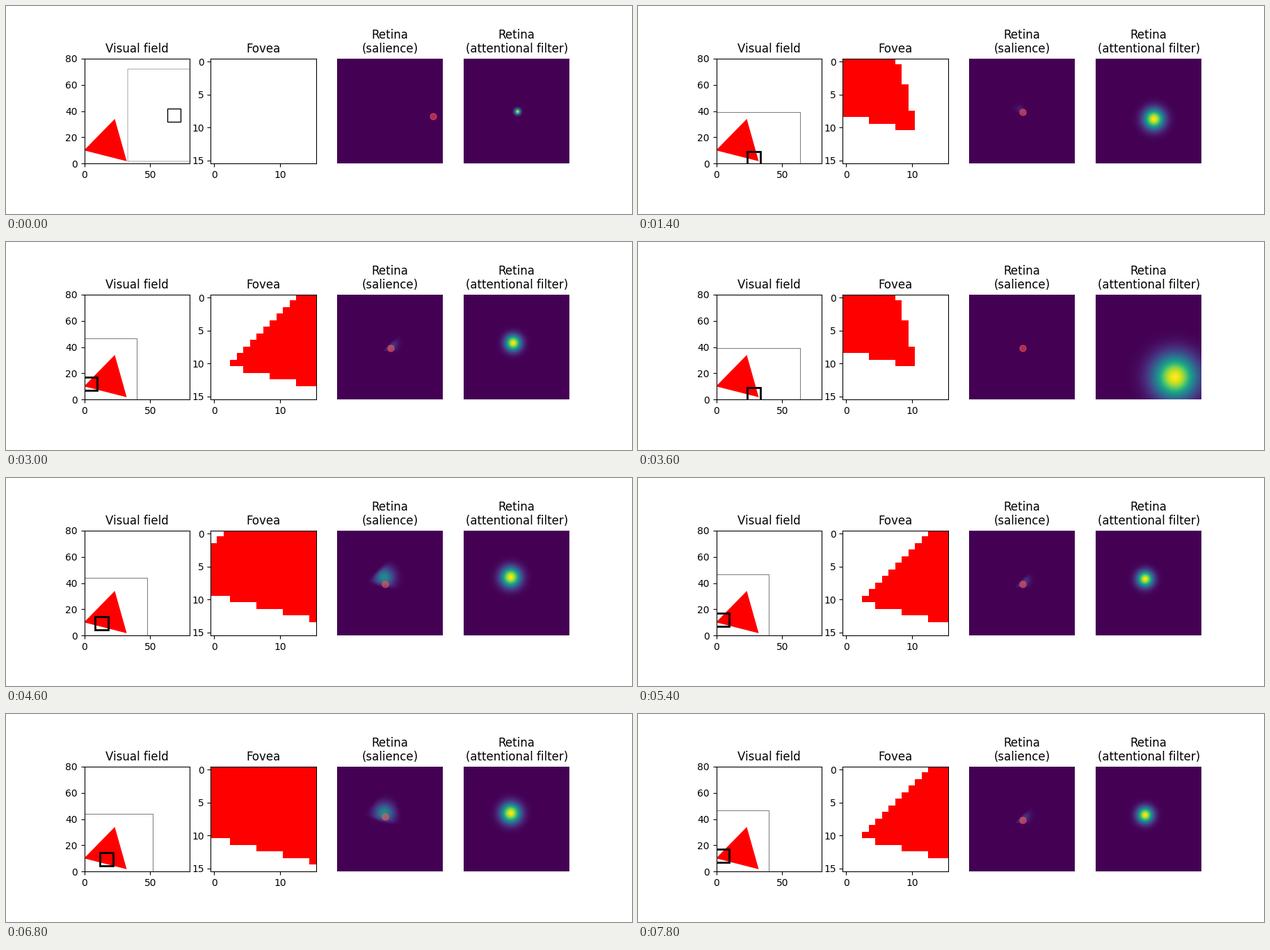
Animation, 900 px wide and 300 px high, one loop 8 s. Source, as a matplotlib script:

```python
import numpy as np
import matplotlib.pyplot as plt
from matplotlib.animation import FuncAnimation
from matplotlib.patches import Polygon, Rectangle

FRAMES, INTERVAL = 40, 200
BLOCK = 4                      # frames that share one attentional filter
FOVEA, RETINA, FIELD = 16, 70, 80
BOX = 10
START = (40, 40)

# equilateral triangle in the visual field
angles = np.radians([75.7, 195.7, 315.7])
TRIANGLE = np.c_[18.4 + 19.3 * np.cos(angles), 15.3 + 19.3 * np.sin(angles)]

# attentional filters: column, row, sigma in retina pixels
NARROW = (35.2, 35.1, 1.25)
SEARCH = (38.1, 40.0, 4.6)
EDGE = (30.7, 30.8, 4.45)
LEFT = (32.3, 32.0, 3.6)
RIGHT = (52.0, 54.6, 9.8)

# gaze after each step of a block
CORNER = (28.6, 4)
SCAN = [(68, 37), (46, 58), (57, 29), (36, 18)]
APPROACH = [(35, 13), (31, 8), CORNER, CORNER]
TO_EDGE = [(25, 5.7), (21, 7.5), (17, 9.2), (13, 9.2)]
TO_LEFT = [(10, 10.2), (7, 11.2), (4.8, 11.85), (4.8, 11.85)]
TO_RIGHT = [(21, 6), CORNER, CORNER, CORNER]

CYCLE = [(EDGE, TO_EDGE), (LEFT, TO_LEFT), (RIGHT, TO_RIGHT)]


def block(i):
    k = i // BLOCK
    if k == 0:
        return NARROW, SCAN
    if k == 1:
        return SEARCH, APPROACH
    return CYCLE[(k - 2) % 3]


def gaze(i):
    return START if i < 0 else block(i)[1][i % BLOCK]


def depth(pos, n):
    """Signed distance into the triangle on an n by n grid around the gaze."""
    step = np.arange(n) - (n - 1) / 2
    x, y = np.meshgrid(pos[0] + 0.15 + step, pos[1] + 1.15 - step)
    dist = []
    for a, b in zip(TRIANGLE, np.roll(TRIANGLE, -1, axis=0)):
        ex, ey = (b - a) / np.hypot(*(b - a))
        dist.append(ex * (y - a[1]) - ey * (x - a[0]))
    return np.min(dist, axis=0)


def fovea_view(pos):
    img = np.ones((FOVEA, FOVEA, 3))
    img[depth(pos, FOVEA) >= 0] = (1, 0, 0)
    return img


def attention(col, row, sigma):
    c, r = np.meshgrid(np.arange(RETINA), np.arange(RETINA))
    return np.exp(-((c - col) ** 2 + (r - row) ** 2) / (2 * sigma ** 2))


def salience(pos, filt):
    return 0.48 * np.clip(depth(pos, RETINA) / 3, 0, 1) * filt


fig, (ax_field, ax_fovea, ax_sal, ax_att) = plt.subplots(
    1, 4, figsize=(9, 3), dpi=100)

ax_field.set_title("Visual field")
ax_field.set_aspect("equal")
ax_field.set(xlim=(0, FIELD), ylim=(0, FIELD),
             xticks=(0, 50), yticks=range(0, 81, 20))
ax_field.add_patch(Polygon(TRIANGLE, fc="red", ec="none"))
retina_box = Rectangle((0, 0), RETINA, RETINA, fc="none", ec="black")
fovea_box = Rectangle((0, 0), BOX, BOX, fc="none", ec="black")
ax_field.add_patch(retina_box)
ax_field.add_patch(fovea_box)

ax_fovea.set_title("Fovea")
fovea_img = ax_fovea.imshow(np.ones((FOVEA, FOVEA, 3)))
ax_fovea.set(xticks=(0, 10), yticks=(0, 5, 10, 15))

blank = np.zeros((RETINA, RETINA))
ax_sal.set_title("Retina\n(salience)")
sal_img = ax_sal.imshow(blank, vmin=0, vmax=1)
dot = ax_sal.scatter([35], [35], s=42, color="#ff5555", alpha=0.55, lw=1)
ax_sal.set_axis_off()

ax_att.set_title("Retina\n(attentional filter)")
att_img = ax_att.imshow(blank, vmin=0, vmax=1)
ax_att.set_axis_off()


def draw(i):
    before, now = gaze(i - 1), gaze(i)
    filt = attention(*block(i)[0])
    scanning = i < BLOCK

    for rect, size in ((retina_box, RETINA), (fovea_box, BOX)):
        rect.set_xy((now[0] - size / 2, now[1] - size / 2))
    retina_box.set_linewidth(0.25 if scanning else 0.37)
    fovea_box.set_linewidth(1 if scanning else 2)

    fovea_img.set_data(fovea_view(now))
    sal_img.set_data(salience(before, filt))
    att_img.set_data(filt)
    # the dot marks the jump that led to the present gaze
    dot.set_offsets([(35 + round(now[0] - before[0]),
                      35 - round(now[1] - before[1]))])
    return retina_box, fovea_box, fovea_img, sal_img, att_img, dot


anim = FuncAnimation(fig, draw, frames=FRAMES, interval=INTERVAL,
                     init_func=lambda: draw(0), repeat=True, repeat_delay=0)
plt.show()
```
